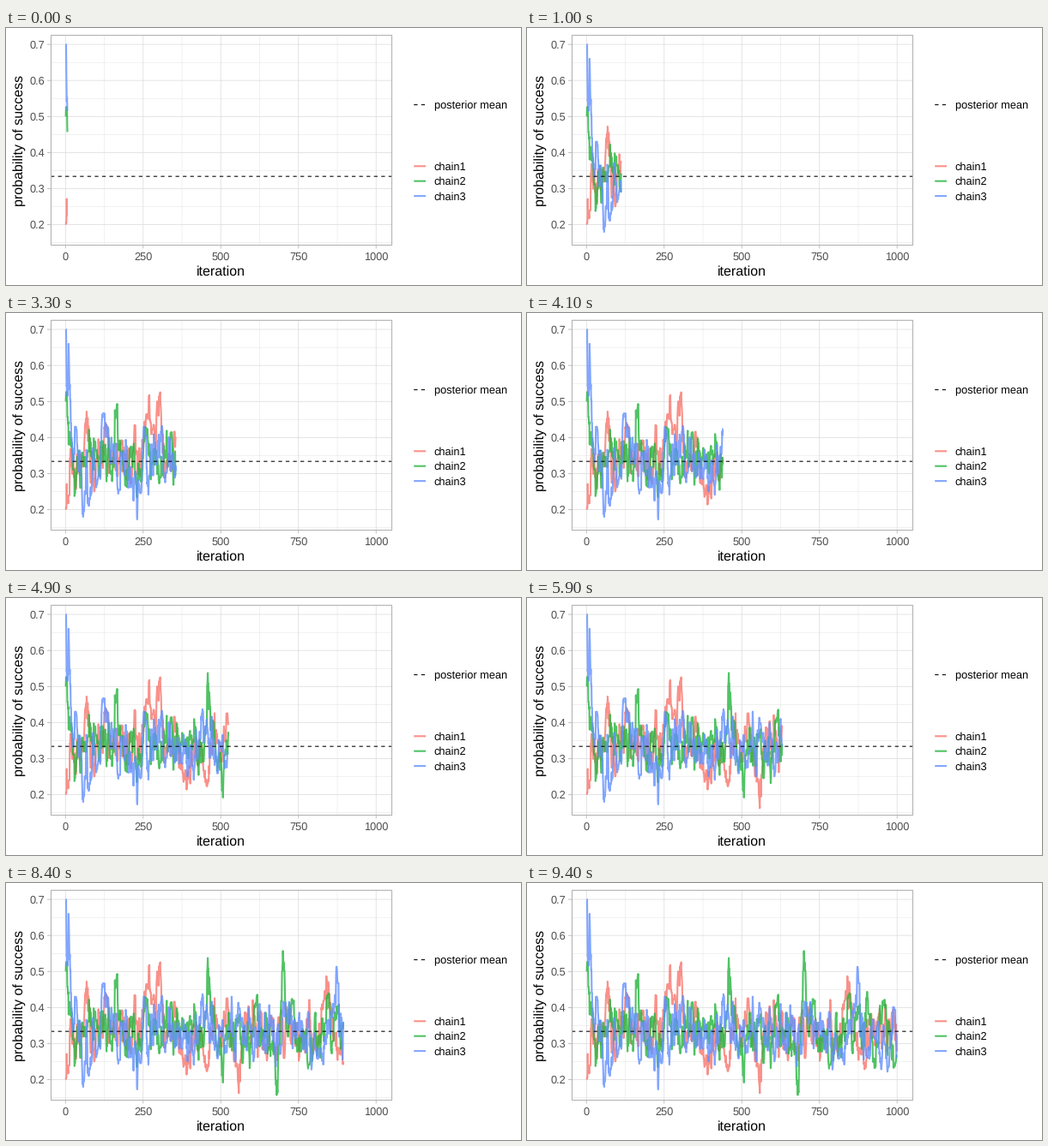
Animation of 600x300 px, one loop 10000 ms. Source, as a matplotlib script:

```python
import numpy as np
import matplotlib.pyplot as plt
from matplotlib.animation import FuncAnimation
from matplotlib.patches import Rectangle

W, H, DPI = 600, 300, 100
PX = 72 / DPI
FRAMES, LAST = 100, 94
LEFT, RIGHT, TOP, BOTTOM = 52, 449, 8.4, 253.4
MEAN, STEPS = 0.334, 1000

plt.rcParams["font.family"] = "Liberation Sans"
plt.rcParams["text.hinting"] = "none"


def sx(i):
    return 69.3 + 0.3619 * np.asarray(i)


def sy(p):
    return 19.1 + 421 * (0.7 - np.asarray(p))


def sample_chain(seed, pins, corr=7, sd=0.053, reach=0.13):
    """Mean-reverting walk that passes through a few key points."""
    rng = np.random.default_rng(seed)
    t = np.arange(1, STEPS + 1)
    phi = np.exp(-1 / corr)
    noise = rng.normal(0, sd * np.sqrt(1 - phi ** 2), STEPS)
    walk = np.zeros(STEPS)
    for i in range(1, STEPS):
        walk[i] = phi * walk[i - 1] + noise[i]

    at, val = np.array(pins).T
    idx = at.astype(int) - 1
    kernel = np.exp(-np.abs(t[:, None] - at) / corr)
    gain = kernel @ np.linalg.inv(kernel[idx])
    wobble = walk - gain @ walk[idx]
    path = MEAN + gain @ (val - MEAN) + reach * np.tanh(wobble / reach)

    # rejected proposals repeat the previous value
    reject = rng.random(STEPS) < 0.3
    reject[idx] = False
    for i in range(1, STEPS):
        if reject[i]:
            path[i] = path[i - 1]
    return t, path


# starting point, burn-in and the most extreme excursions
RED = [(1, .2), (6, .226), (20, .33), (69, .46),
       (270, .518), (303, .52), (557, .18), (840, .487)]
GREEN = [(1, .5), (5, .51), (6, .457), (166, .493),
         (459, .508), (507, .192), (682, .168), (699, .523)]
BLUE = [(1, .7), (3, .61), (10, .66), (30, .43),
        (60, .2), (120, .467), (231, .173), (872, .513)]

CHAINS = [("chain1", "#F8766D", sample_chain(4, RED)),
          ("chain2", "#24B43D", sample_chain(11, GREEN)),
          ("chain3", "#6390FF", sample_chain(23, BLUE))]
ALPHA = 0.8

fig = plt.figure(figsize=(W / DPI, H / DPI), dpi=DPI, facecolor="white")
ax = fig.add_axes([0, 0, 1, 1])
ax.set_xlim(0, W)
ax.set_ylim(H, 0)
ax.axis("off")


def line(xs, ys, color, width, **kw):
    return ax.plot(xs, ys, color=color, lw=width * PX, snap=False,
                   solid_capstyle="butt", solid_joinstyle="round", **kw)[0]


def text(x, y, s, size=12.8, color="black", **kw):
    ax.text(x, y, s, fontsize=size * PX, color=color, va="baseline", **kw)


def dashed(x0, x1, y):
    line([x0, x1], [y, y], "black", 1.07, zorder=5,
         dashes=(4, 4), dash_capstyle="butt")


# grid, ticks and tick labels
GRID, EDGE, LABEL = "#DEDEDE", "#B3B3B3", "#4D4D4D"
for i in range(0, 1001, 125):
    x = sx(i)
    major = i % 250 == 0
    line([x, x], [TOP, BOTTOM], GRID, 0.8 if major else 0.4, zorder=1)
    if major:
        line([x, x], [BOTTOM, BOTTOM + 4], EDGE, 0.8, zorder=1)
        text(x, 271.2, str(i), color=LABEL, ha="center")
for j in range(3, 15):
    y = sy(j / 20)
    major = j % 2 == 0
    line([LEFT, RIGHT], [y, y], GRID, 0.8 if major else 0.4, zorder=1)
    if major:
        line([LEFT - 4, LEFT], [y, y], EDGE, 0.8, zorder=1)
        text(45, y + 4.7, f"{j / 20:.1f}", color=LABEL, ha="right")

ax.add_patch(Rectangle((LEFT, TOP), RIGHT - LEFT, BOTTOM - TOP, fill=False,
                       ec=EDGE, lw=1.1 * PX, zorder=6))
dashed(LEFT, RIGHT, sy(MEAN))

text(250.5, 289, "iteration", 16, ha="center")
text(19.5, 131, "probability of success", 16, rotation=90,
     rotation_mode="anchor", ha="center")

# legend
dashed(475.2, 489, 89.6)
text(498.6, 94.2, "posterior mean")
for row, (name, color, _) in enumerate(CHAINS):
    y = 161.3 + 17.4 * row
    line([475.2, 489], [y, y], color, 2.1, alpha=ALPHA)
    text(498.6, y + 4.6, name)

traces = [line([], [], color, 2.1, alpha=ALPHA, zorder=3)
          for _, color, _ in CHAINS]


def update(k):
    end = 6 + (STEPS - 6) * min(k, LAST) / LAST
    n = int(end)
    for trace, (_, _, (t, p)) in zip(traces, CHAINS):
        xs = np.append(t[:n], end)
        ys = np.append(p[:n], np.interp(end, t, p))
        trace.set_data(sx(xs), sy(ys))
    return traces


anim = FuncAnimation(fig, update, frames=FRAMES, interval=100,
                     repeat=True, repeat_delay=0, blit=False)
plt.show()
```
